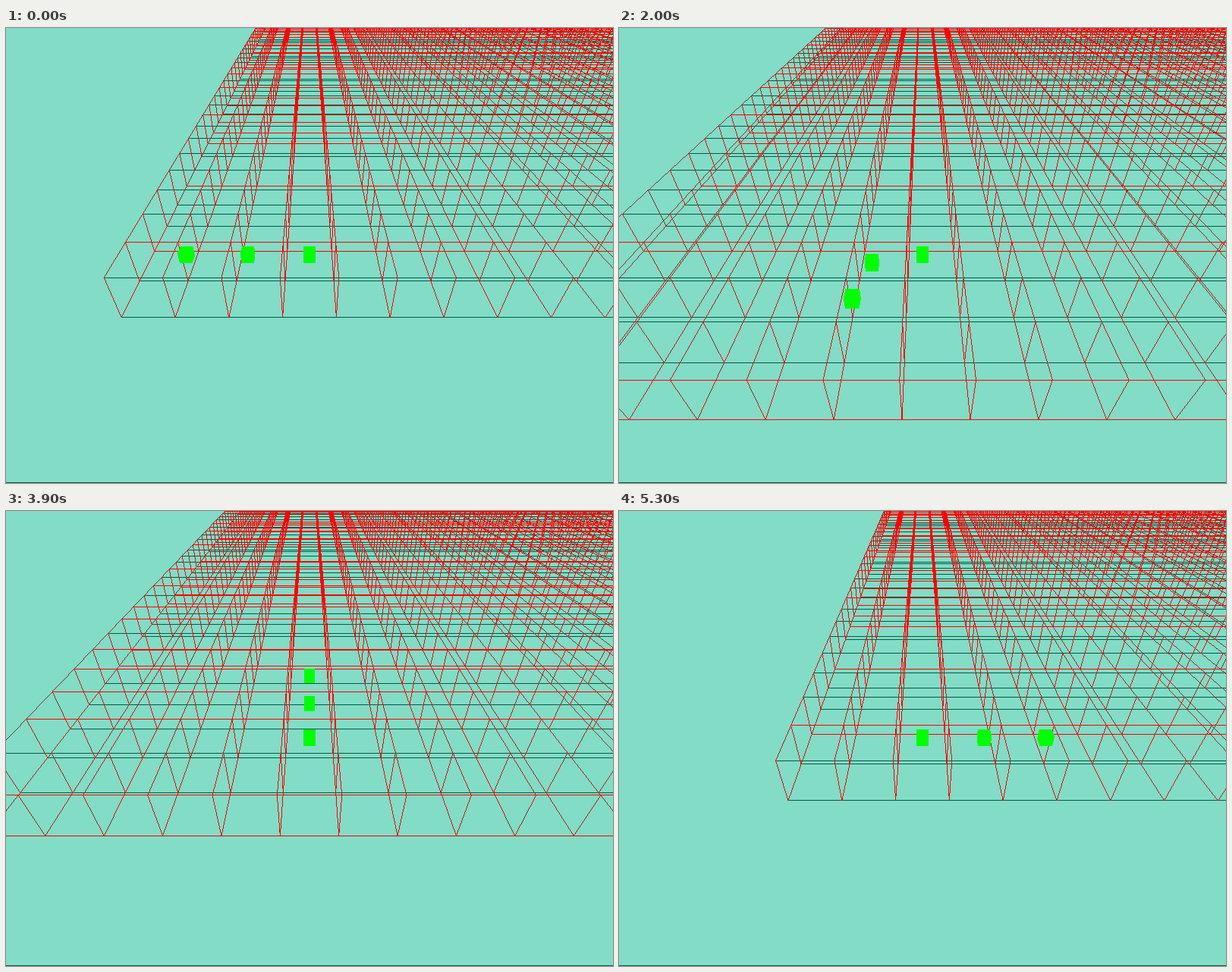
These frames come from a looping animation (800 px wide and 600 px high, 7.7 s). An HTML page with a canvas:

```html
<!DOCTYPE html>
<html>
<head>
<meta charset="utf-8">
<title>Cubes on a wire grid</title>
<style>
html, body { margin: 0; width: 100%; height: 100%; overflow: hidden; background: #82dcc6; }
canvas { display: block; }
</style>
</head>
<body>
<canvas id="stage" width="800" height="600"></canvas>
<script>
const W = 800, H = 600, LOOP = 7700, STEP = 100, MOVE = 165;
const CX = 400, CY = 299, FOCAL = 300 / Math.tan(Math.PI / 6);
const CAM_UP = 4, CAM_BACK = 5, CELLS = 50;
const DIST = Math.hypot(CAM_UP, CAM_BACK);
const COS = CAM_BACK / DIST, SIN = CAM_UP / DIST;

const ctx = document.getElementById('stage').getContext('2d');
const image = ctx.createImageData(W, H);
const pixels = new Uint32Array(image.data.buffer);
const mask = new Uint8Array(W * H);
const rgb = (r, g, b) => (255 << 24 | b << 16 | g << 8 | r) >>> 0;
const BACK = rgb(130, 220, 198), RED = rgb(255, 0, 0), DARK = rgb(5, 90, 69), GREEN = rgb(0, 255, 0);

// Cells visited, from the tail's first place onwards
const DIRS = { R: [1, 0], L: [-1, 0], U: [0, 1], D: [0, -1] };
const path = [[1.5, 0]];
for (const c of 'RR' + 'RURURULDDDLLL') {
  const [x, z] = path[path.length - 1];
  path.push([x + DIRS[c][0], z + DIRS[c][1]]);
}
const starts = [418, 801, 1167, 1518, 1867, 2218, 2618, 3001, 3418, 3867, 4218, 4667, 5118];

function progress(t) {
  return starts.reduce((sum, s) =>
    sum + Math.round(10 * Math.min(1, Math.max(0, (t - s) / MOVE))) / 10, 0);
}

function place(s) {
  const i = Math.min(Math.floor(s), path.length - 2), f = s - i;
  return path[i].map((v, k) => v + (path[i + 1][k] - v) * f);
}

// x right, y up, z away, all measured from the head
function project(x, y, z) {
  const down = CAM_UP - y, ahead = CAM_BACK + z;
  const scale = FOCAL / (ahead * COS + down * SIN);
  return [CX + x * scale, CY + (down * COS - ahead * SIN) * scale];
}

function line(a, b) {
  const flat = Math.abs(b[0] - a[0]) > Math.abs(b[1] - a[1]);
  const m = flat ? 0 : 1, n = 1 - m;
  if (a[m] > b[m]) [a, b] = [b, a];
  const slope = (b[n] - a[n]) / (b[m] - a[m] || 1);
  const end = Math.min(flat ? W : H, Math.ceil(b[m] - 0.5));
  for (let i = Math.max(0, Math.ceil(a[m] - 0.5)); i < end; i++) {
    const j = Math.floor(a[n] + (i + 0.5 - a[m]) * slope);
    if (j < 0 || j >= (flat ? H - 1 : W)) continue;
    mask[flat ? j * W + i : i * W + j] = 1;
  }
}

function drawGrid(hx, hz) {
  mask.fill(0);
  const at = (j, k, y) => project(j - hx, y, k - hz);
  for (const y of [-0.5, -1.5]) {
    for (let i = 0; i <= CELLS; i++) {
      line(at(0, i, y), at(CELLS, i, y));
      line(at(i, 0, y), at(i, CELLS, y));
    }
  }
  for (let j = 0; j <= CELLS; j++)
    for (let k = 0; k <= CELLS; k++) line(at(j, k, -0.5), at(j, k, -1.5));
  mask.fill(1, (H - 1) * W);

  // Odd rows show red only under a marked even row
  for (let p = 0; p < W * H; p++) {
    const odd = Math.floor(p / W) & 1;
    pixels[p] = !mask[p] ? BACK : odd && !mask[p - W] ? DARK : RED;
  }
}

function drawCube(x, z) {
  const r = 0.1, pts = [];
  for (const a of [-r, r]) for (const b of [-r, r]) for (const c of [-r, r])
    pts.push(project(x + a, b, z + c));
  for (let y = 0; y < H - 1; y++) {
    let lo = W, hi = 0;
    for (const p of pts) for (const q of pts) {
      if (p[1] > y + 0.5 || q[1] <= y + 0.5) continue;
      const cut = p[0] + (q[0] - p[0]) * (y + 0.5 - p[1]) / (q[1] - p[1]);
      lo = Math.min(lo, cut);
      hi = Math.max(hi, cut);
    }
    if (lo < hi) pixels.fill(GREEN, y * W + Math.round(lo), y * W + Math.round(hi));
  }
}

let shown = -1;
function frame(now) {
  const t = Math.floor(now % LOOP / STEP) * STEP;
  const s = progress(t);
  if (s !== shown) {
    shown = s;
    const [hx, hz] = place(s + 2);
    drawGrid(hx, hz);
    for (let n = 0; n < 3; n++) {
      const [x, z] = place(s + n);
      drawCube(x - hx, z - hz);
    }
    ctx.putImageData(image, 0, 0);
  }
  requestAnimationFrame(frame);
}
frame(0);
</script>
</body>
</html>
```
